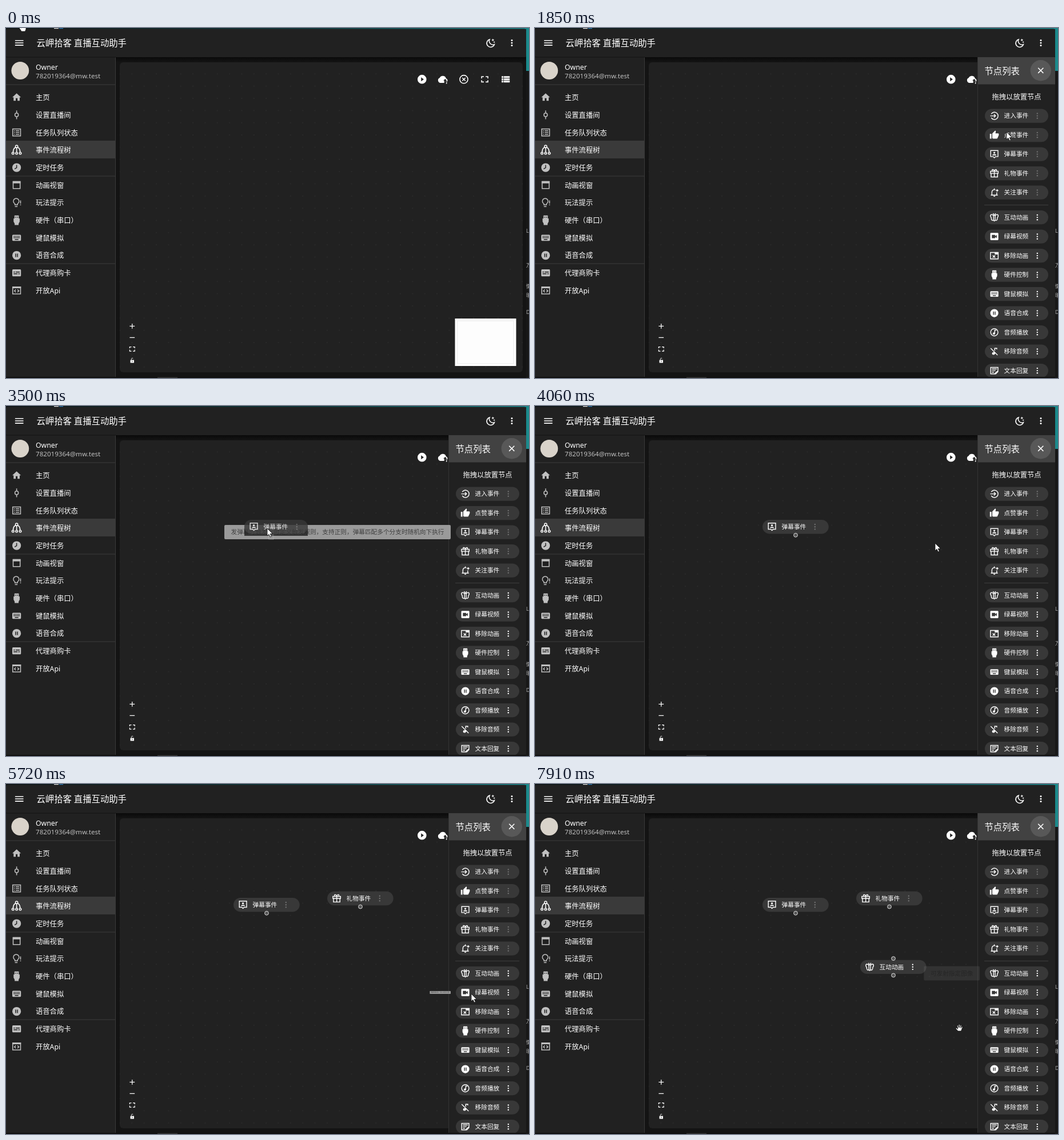
Write an HTML page that moves like this. It is 915x612 px and loops after 8000 ms.

```html
<!DOCTYPE html>
<html lang="zh-CN">
<head>
<meta charset="utf-8">
<title>直播互动助手</title>
<style>
html, body { margin: 0; width: 915px; height: 612px; overflow: hidden; background: #121212; }
svg { display: block; }
#stage { font: 12.3px "Noto Sans", "Noto Sans CJK SC", sans-serif; fill: #fff; color: #fff; }
.fill { fill: currentColor; fill-rule: evenodd; }
.line { fill: none; stroke: currentColor; stroke-width: 2; }
.pill { font-size: 10.7px; font-weight: 500; }
.tip { font-size: 10.66px; }
</style>
</head>
<body>
<svg id="stage" width="915" height="612" viewBox="0 0 915 612">
  <defs>
    <linearGradient id="teal"><stop offset="0" stop-color="#0a1214"/><stop offset=".6" stop-color="#0d4146"/><stop offset="1" stop-color="#1b8a90"/></linearGradient>
    <linearGradient id="shade" x2="0" y2="1"><stop offset="0" stop-color="#0a0a0a"/><stop offset="1" stop-color="#141414"/></linearGradient>
    <pattern id="dots" x="209.6" y="69.6" width="21.35" height="21.35" patternUnits="userSpaceOnUse"><circle cx="10.7" cy="10.7" r=".65" fill="#3a3a3a"/></pattern>
  </defs>
  <g id="app"></g>
  <g id="nodes"></g>
  <g id="drawer"></g>
  <g id="live"></g>
</svg>
<script>
const $ = id => document.getElementById(id);
const fill = d => `<path class="fill" d="${d}"/>`;
const line = d => `<path class="line" d="${d}"/>`;
const rect = (x, y, w, h, color, r = 0) => `<rect x="${x}" y="${y}" width="${w}" height="${h}" rx="${r}" fill="${color}"/>`;
const dot = (x, y, r, color = "currentColor") => `<circle cx="${x}" cy="${y}" r="${r}" fill="${color}"/>`;
const ring = (x, y, r) => `<circle class="line" cx="${x}" cy="${y}" r="${r}"/>`;
const disc = "M12 2a10 10 0 1 0 0 20 10 10 0 1 0 0-20z";

// Icons on a 24 unit grid
const icons = {
  menu: fill("M3 18h18v-2H3zm0-5h18v-2H3zm0-7v2h18V6z"),
  moon: line("M9.500 4a9 9 0 1 0 11 11.500A8.500 8.500 0 0 1 9.500 4z") + fill("M17 2l1 2.400 2.500 1-2.500 1-1 2.400-1-2.400-2.500-1 2.500-1zM20 8l.7 1.700 1.700.7-1.700.7-.7 1.700-.7-1.700-1.700-.7 1.700-.7z"),
  more: dot(12, 6, 2) + dot(12, 12, 2) + dot(12, 18, 2),
  home: fill("M10 20v-6h4v6h5v-8h3L12 3 2 12h3v8z"),
  commit: line("M12 2v6M12 16v6") + ring(12, 12, 4),
  list: line("M3 4h18v16H3z") + line("M6 8h2m2 0h8M6 12h2m2 0h8M6 16h2m2 0h8"),
  tree: ring(12, 4, 2.8) + ring(3.6, 19.5, 2.3) + ring(12, 19.5, 2.3) + ring(20.4, 19.5, 2.3) +
    line("M12 7v10M9.500 6C5 8 4 11 4 17M14.500 6c4.500 2 5.500 5 5.500 11"),
  clock: fill(disc + "M11 6h2v7l-5 3-1-1.600 4-2.400z"),
  window: line("M4 4h16v16H4z") + fill("M3 3h18v5H3z"),
  bulb: line("M8 17v-2.500a6.500 6.500 0 1 1 6 0V17zM8 21h6") + fill("M20 7h2v7h-2zM20 16h2v2h-2z"),
  plug: fill("M7 1h10v7h2v7l-2.500 5v3h-9v-3L5 15V8h2zM9 4v2h2V4zM13 4v2h2V4z"),
  keys: fill("M4 5h16a2 2 0 0 1 2 2v10a2 2 0 0 1-2 2H4a2 2 0 0 1-2-2V7a2 2 0 0 1 2-2z" +
    [5, 8, 11, 14, 17].map(x => `M${x} 8h2v2h-2zM${x} 11h2v2h-2z`).join("") + "M8 15h8v2H8z"),
  pause: fill(disc + "M9 8h2v8H9zM13 8h2v8h-2z"),
  card: fill("M4 4h16a2 2 0 0 1 2 2v12a2 2 0 0 1-2 2H4a2 2 0 0 1-2-2V6a2 2 0 0 1 2-2zM5 9h3v2H5zM10 9h9v2h-9zM5 13h9v2H5zM16 13h3v2h-3z"),
  code: line("M3 4h18v16H3zM10 10l-3 3 3 3M14 10l3 3-3 3") + fill("M2 3h20v4H2z"),
  enter: line("M4.500 7.500A9 9 0 1 1 4.500 16.500M2 12h12M11 8l4 4-4 4"),
  like: fill("M1 21h4V9H1zM23 10a2 2 0 0 0-2-2h-6.300l1-4.600a1.500 1.500 0 0 0-.4-1.300L14.200 1 7.600 7.600A2 2 0 0 0 7 9v10a2 2 0 0 0 2 2h9a2 2 0 0 0 1.800-1.200l3-7a2 2 0 0 0 .2-.8z"),
  chat: line("M3 3h18v15h-6l-3 3-3-3H3z") + dot(12, 8.5, 2.3) + fill("M7 15c0-4 10-4 10 0z"),
  gift: line("M2.500 7h19v5h-19zM4 12v9h16v-9M12 7v14M12 6C10 1 5 2 7 6M12 6c2-5 7-4 5 0"),
  bell: line("M6 18v-7a6 6 0 0 1 8.500-5.400M18 12v6M3.500 18.500h17M12 2v3M10 21.500h4M19 4v6M16 7h6"),
  wings: line("M10 8C6 3 2 5 2.500 9c.3 2 1 3 2 4-.5 6 3 8 5.500 6M14 8c4-5 8-3 7.500 1-.3 2-1 3-2 4 .5 6-3 8-5.500 6M10 7h4v12l-2 2-2-2zM9 2l2 4M15 2l-2 4"),
  video: fill("M4 3h16a2 2 0 0 1 2 2v14a2 2 0 0 1-2 2H4a2 2 0 0 1-2-2V5a2 2 0 0 1 2-2zM6 8v8h8v-3l4 3V8l-4 3V8z"),
  remove: line("M2.500 4h19v16h-19zM8 11l6 6M14 11l-6 6") + fill("M13 4h8v5h-8z"),
  music: ring(12, 12, 9) + line("M13 15V7h4") + dot(11, 15, 2.8),
  mute: line("M3 4l17 17M13 10V4h5v3M13 14v3") + dot(10, 17, 3.5),
  note: line("M14 20H3V4h18v9M6 8h12M6 12h9M6 16h5") + fill("M13 21v-3l7-6 2.500 2.500-6.500 6.500z"),
  play: fill(disc + "M10 7.500v9l6-4.500z"),
  cloud: fill("M19 10A7.500 7.500 0 0 0 5 8.500 6 6 0 0 0 6 20h9v-5h-2l4-4 4 4h-2v4.500a5 5 0 0 0 0-9.500zM18 16h3v6h-2v-4z"),
  cancel: ring(12, 12, 9) + line("M8.500 8.500l7 7M15.500 8.500l-7 7"),
  full: line("M5 10V6h5M14 6h5v4M19 14v4h-5M10 18H5v-4"),
  rows: fill("M3 5h4v4H3zM8 5h13v4H8zM3 10h4v4H3zM8 10h13v4H8zM3 15h4v4H3zM8 15h13v4H8z"),
  close: line("M6 6l12 12M18 6L6 18"),
  plus: line("M12 5v14M5 12h14"),
  minus: line("M5 12h14"),
  lock: fill("M5 10h14v11H5zM10.500 14h3v3h-3z") + line("M9 10V6a3.500 3.500 0 0 1 6.500-1")
};

const icon = (name, cx, cy, size = 18.3, color = "#fff") =>
  `<g color="${color}" transform="translate(${cx - size / 2} ${cy - size / 2}) scale(${size / 24})">${icons[name]}</g>`;
const text = (s, x, cy, size = 12.3, extra = "") =>
  `<text x="${x}" y="${cy + size * .36}" font-size="${size}" ${extra}>${s}</text>`;

const menu = [
  ["home", "主页"], ["commit", "设置直播间"], ["list", "任务队列状态"], ["tree", "事件流程树"],
  ["clock", "定时任务"], ["window", "动画视窗"], ["bulb", "玩法提示"], ["plug", "硬件（串口）"],
  ["keys", "键鼠模拟"], ["pause", "语音合成"], ["card", "代理商购卡"], ["code", "开放Api"]
];
const items = [
  ["enter", "进入事件"], ["like", "点赞事件"], ["chat", "弹幕事件"], ["gift", "礼物事件"], ["bell", "关注事件"],
  ["wings", "互动动画"], ["video", "绿幕视频"], ["remove", "移除动画"], ["plug", "硬件控制"], ["keys", "键鼠模拟"],
  ["pause", "语音合成"], ["music", "音频播放"], ["mute", "移除音频"], ["note", "文本回复"]
];
const isEvent = i => i < 5;

function pill(i, x, y, w = 111) {
  const color = isEvent(i) ? "#707070" : "#fff";
  return `<g class="pill" transform="translate(${x} ${y})">${rect(0, 0, w, 24.4, "#383838", 12.2)}` +
    icon(items[i][0], 16.6, 12.2, 17) + text(items[i][1], 33.5, 12.2, 10.7) +
    [8, 12.2, 16.4].map(cy => dot(91.8, cy, 1.2, color)).join("") + "</g>";
}

function node(i, x, y) {
  const port = cy => `<circle cx="${x + 58}" cy="${cy}" r="3.4" fill="#555" stroke="#ddd"/>`;
  return pill(i, x, y, 115.7) + port(y + 26.8) + (isEvent(i) ? "" : port(y - 2.6));
}

function drawApp() {
  const edge = [["Li", 355], ["万", 415], ["懒", 452], ["明", 468], ["D", 497]];
  $("app").innerHTML =
    rect(0, 0, 915, 612, "#0e0e0e") + rect(0, 0, 911, 2, "url(#teal)") + rect(84, 0, 8, 1.5, "#ddd") + rect(93, 0, 7, 1.5, "#2878b8") +
    rect(265, 610.5, 35, 1.5, "#333") +
    rect(910, 0, 5, 75, "#1b8a8c") + rect(910, 75, 5, 537, "#171717") +
    edge.map(([s, y]) => text(s, 910, y, 9, 'fill="#b0b0b0"')).join("") +
    rect(0, 1.5, 910, 50, "#212121", 3) + rect(192, 51, 718, 559, "#141414") + rect(192, 51, 718, 9, "url(#shade)") +
    rect(199, 60, 705, 542, "#212121", 6) + rect(199, 66, 705, 530, "url(#dots)") +
    rect(0, 51, 191.5, 559, "#212121") + rect(191, 51, 1, 559, "#3a3a3a") + rect(0, 50.5, 192, 1, "#151515") +
    rect(0, 197, 191.5, 31, "#3a3a3a") + [98.5, 258.5, 411.5].map(y => rect(0, y, 191, 1, "#3d3d3d")).join("") +
    icon("menu", 23.2, 26, 19.5) + text("云岬拾客 直播互动助手", 53.5, 26.5, 15.35) +
    icon("moon", 848, 26) + icon("more", 885, 26) +
    dot(24.8, 74.5, 15.4, "#d9d3ca") +
    text("Owner", 52, 69) + text("782019364@mw.test", 52, 83.5, 11.6, 'fill="#c0c0c0"') +
    menu.map(([name, label], i) => {
      const y = 121.2 + 30.7 * i;
      return icon(name, 18.6, y, 18.3, i === 3 ? "#fff" : "#c0c0c0") + text(label, 52, y + .5);
    }).join("") +
    ["play", "cloud", "cancel", "full", "rows"].map((name, i) => icon(name, 727.8 + 36.6 * i, 89.7, 18.8)).join("") +
    ["plus", "minus", "full", "lock"].map((name, i) => icon(name, 220.8, 521.3 + 20 * i, i === 3 ? 11 : 15)).join("") +
    rect(785.5, 508, 107, 83, "#fff") + rect(789, 511.5, 100, 76, "#f1f1f1") + rect(790.5, 513, 97, 73, "#fdfdfd");
}

function drawDrawer() {
  $("drawer").innerHTML =
    rect(774, 51, 136, 559, "#212121") + rect(774, 51, 1, 559, "#343434") + rect(775, 51, 135, 47.5, "#424242") +
    text("节点列表", 786.5, 75, 15.35) + dot(884.8, 74.3, 18.2, "#585858") + icon("close", 884.8, 74.3) +
    text("拖拽以放置节点", 799.5, 120.8) + rect(786, 309, 112, 1, "#3d3d3d") +
    `<svg width="915" height="610">${items.map((_, i) => pill(i, 787, 141.4 + 33.5 * i + (isEvent(i) ? 0 : 10))).join("")}</svg>`;
}

// Tooltips: text, right edge, vertical centre
const tips = {
  list: ["展示节点列表", 847, 89.5],
  chat: ["发弹幕时触发，可定义触发规则，支持正则，弹幕匹配多个分支时随机向下执行", 778, 220.5],
  gift: ["送礼时触发，可定义触发礼物id，一次送出多个将触发多次，存在同id的多个分支时随机向下执行", 778, 254],
  wings: ["可发射指定图像", 778, 331],
  video: ["播放绿幕视频，可定义视频与位置", 778, 364.5]
};

function drawTip(name, scale = 1, alpha = .93) {
  const [label, right, cy] = tips[name];
  const g = document.createElementNS("http://www.w3.org/2000/svg", "g");
  g.setAttribute("class", "tip");
  g.setAttribute("opacity", alpha);
  g.innerHTML = text(label, -11.5, 0, 10.66, 'text-anchor="end" fill="#424242"');
  $("live").append(g);
  const w = g.firstChild.getComputedTextLength() + 23;
  g.insertAdjacentHTML("afterbegin", rect(-w, -12.5, w, 25, "#a4a4a4", 2));
  g.setAttribute("transform", `translate(${right} ${cy}) scale(${scale})`);
}

const outline = 'fill="#fff" stroke="#111" stroke-width=".8" stroke-linejoin="round"';
const cursors = {
  arrow: `<path ${outline} d="M0 0v13l3-2.700 2.200 4.700 2.200-1-2.200-4.500h4.300z"/>`,
  point: `<path ${outline} d="M0 0c-1.500 0-1.500 1-1.500 2v6l-2-1.500c-1 0-1.500 1-1 2l3.500 5.500h6.500l1.500-4V6.500c0-1.500-2-1.500-2.500-.8-.5-1.200-2-1-2.300-.4V2C2 1 1.500 0 0 0z"/>`,
  grab: `<path ${outline} d="M-2 6l-3.500-4c-.8-1.500.8-2 1.800-1L-2.200 2.500-3.500-3c0-1.500 1.700-1.500 2 0l.7 3V-4.500c0-1.500 2-1.500 2 0V0l1-3.700c.4-1.300 2-.8 1.800.4L3.200.7l1.200-2c1-1 2-.2 1.500 1L3.500 6z"/>`
};
cursors.drag = cursors.arrow + '<rect x="2.500" y="11.500" width="8.500" height="7.500" fill="none" stroke="#bbb" stroke-dasharray="1 1"/>';

const ghost = (i, x, y) => `<g opacity=".82">${rect(x, y + 10, 111, 18, "#212121") + pill(i, x, y)}</g>`;

const placed = [[2, 398, 199], [3, 562, 187.8], [5, 569, 307.7]];

// time, cursor, x, y, nodes placed, tooltip, ghost
const steps = [
  [0, "point", 28, -8, 0],
  [220, "point", 872, 88, 0],
  [500, "point", 874, 88, 0, ["list"]],
  [750, "point", 874, 88, 0, ["list"]],
  [1020, "arrow", 842, 130, 0, ["list"]],
  [1300, "arrow", 827, 149, 0, ["list"]],
  [1580, "arrow", 826, 165, 0],
  [1850, "arrow", 825, 182, 0],
  [2120, "arrow", 824, 206, 0],
  [2380, "arrow", 823, 225, 0, ["chat", .92]],
  [2650, "arrow", 826, 223, 0, ["chat"]],
  [2920, "arrow", 827, 223, 0, ["chat"]],
  [3220, "drag", 692, 214, 0, ["chat"], [2, 652, 199]],
  [3500, "drag", 457, 214, 0, ["chat"], [2, 417, 199]],
  [3780, "arrow", 438, 214, 1, ["chat"]],
  [4060, "arrow", 700, 240, 1],
  [4330, "arrow", 829, 248, 1, ["gift"]],
  [4590, "drag", 776, 248, 1, ["gift"], [3, 734, 241.5]],
  [4860, "drag", 604, 216, 1, ["gift"], [3, 561, 209.5]],
  [5160, "arrow", 604, 195, 2, ["gift"]],
  [5440, "arrow", 795, 300, 2],
  [5720, "arrow", 814, 367, 2, ["video", .2]],
  [6000, "arrow", 820, 345, 2],
  [6260, "arrow", 827, 330, 2, ["wings"]],
  [6540, "drag", 773, 330, 2, ["wings"], [5, 733, 319]],
  [6800, "drag", 685, 330, 2, ["wings"], [5, 645, 319]],
  [7100, "drag", 621, 322, 2, ["wings"], [5, 581, 311]],
  [7370, "drag", 609, 319, 2, ["wings"], [5, 569, 308]],
  [7630, "arrow", 609, 319, 3, ["wings"]],
  [7910, "grab", 742, 426, 3, ["wings", 1, .13]]
];

function show([time, cursor, x, y, count, tip, drag]) {
  $("drawer").style.display = time < 750 ? "none" : "";
  $("nodes").innerHTML = placed.slice(0, count).map(p => node(...p)).join("");
  $("live").innerHTML = "";
  if (tip) drawTip(...tip);
  $("live").insertAdjacentHTML("beforeend",
    (drag ? ghost(...drag) : "") + `<g transform="translate(${x} ${y})">${cursors[cursor]}</g>`);
}

drawApp();
drawDrawer();
const start = performance.now();
let current;
function tick() {
  const t = (performance.now() - start) % 8000;
  const step = steps.findLast(s => s[0] <= t);
  if (step !== current) show(current = step);
  requestAnimationFrame(tick);
}
tick();
</script>
</body>
</html>
```
